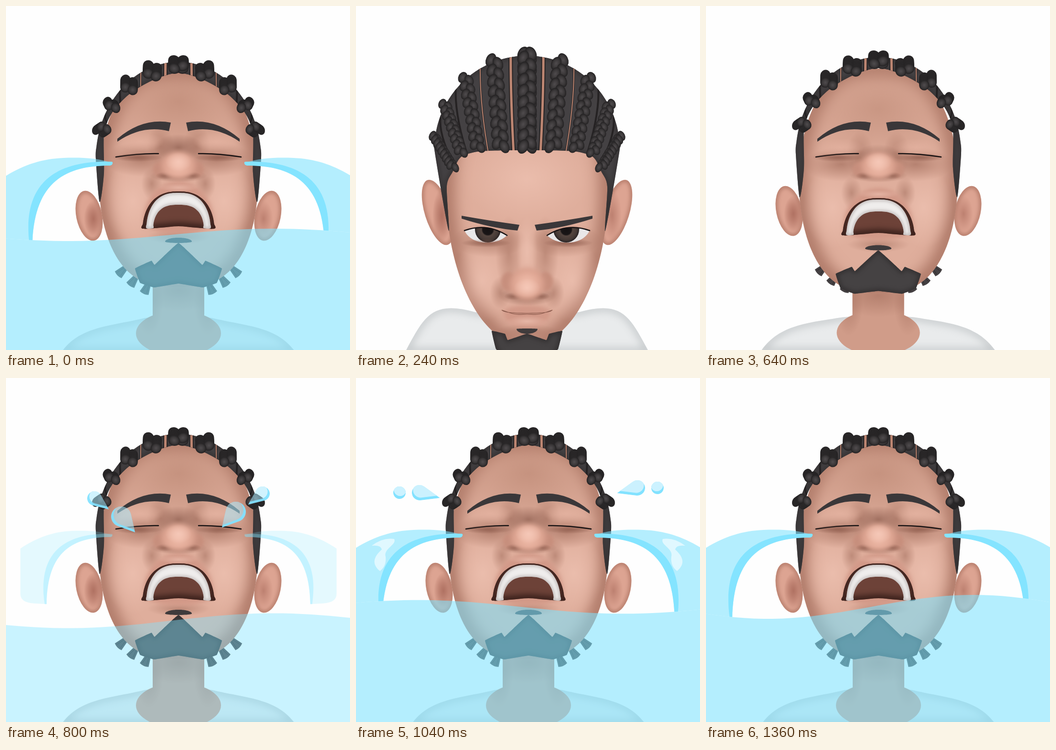
An HTML page with a canvas that plays this animation: 720x720 px, repeating every 1.44 s.

```html
<!DOCTYPE html>
<html>
<head>
<meta charset="utf-8">
<style>
  html, body { margin: 0; overflow: hidden; background: #fefefe; }
  canvas { display: block; }
</style>
</head>
<body>
<canvas id="stage" width="720" height="720"></canvas>
<script>
const ctx = document.getElementById('stage').getContext('2d');
const LOOP = 1440, STEP = 80, { PI, sin, cos } = Math;
const DARK = '#9a6554', LIGHT = '#efc3b3';

// Streams and glints, relative to the outer corner of the eye.
const STREAM = new Path2D('M0 0C-30-12-70-12-102-11C-150-9-190 5-234 34V150Q-234 172-200 174L-167 176C-165 40-100 5 0 4Z');
const BAND = new Path2D('M0-3C-90-6-195 20-172 176H-167C-165 40-100 5-4 5Q4 1 0-3Z');
const GLINT = new Path2D('M-189 22Q-165 4-142 8C-136 20-165 28-160 45Q-158 65-172 75C-190 60-185 45-168 30Q-170 20-189 22Z');

// Head pitch: 0 bowed, 1 level, 2 thrown back. Drawing is centred on the face axis.
let pitch = 0;
const at = (bowed, level, back) => pitch < 1 ? bowed + (level - bowed) * pitch : level + (back - level) * (pitch - 1);
const browY = () => at(457, 370, 250);
const eyeY = () => at(478, 410, 311);
const noseY = () => at(582, 496, 334);
const mouthY = () => at(643, 567, 425);

function track(t, ...keys) {
  for (let i = 0; i < keys.length - 2; i += 2) {
    const [t0, v0, t1, v1] = keys.slice(i, i + 4);
    if (t <= t0) return v0;
    if (t < t1) return v0 + (v1 - v0) * (t - t0) / (t1 - t0);
  }
  return keys[keys.length - 1];
}

function scoped(fn) { ctx.save(); fn(); ctx.restore(); }
function both(fn) { fn(); scoped(() => { ctx.scale(-1, 1); fn(); }); }

// Left half of an egg; a power below 1 makes it squarer. Ends at its widest if there is no bottom.
function egg(width, top, mid, power = 1, bottom) {
  const half = [], n = bottom ? 24 : 12;
  for (let i = 0; i <= n; i++) {
    const a = i * PI / 24, c = cos(a);
    half.push([-width * Math.max(0, sin(a)) ** power, mid - c * (c > 0 ? mid - top : bottom - mid)]);
  }
  half[0][0] = 0;
  if (bottom) half[n][0] = 0;
  return half;
}

// Smooth closed outline through a left half, from top centre to bottom centre, and its mirror image.
function symmetric(half, bend = 1 / 6) {
  const p = half.concat(half.slice(1, -1).reverse().map(([x, y]) => [-x, y]));
  const path = new Path2D(), n = p.length;
  path.moveTo(...p[0]);
  for (let i = 0; i < n; i++) {
    const [a, b, c, d] = [n - 1, 0, 1, 2].map(k => p[(i + k) % n]);
    path.bezierCurveTo(b[0] + (c[0] - a[0]) * bend, b[1] + (c[1] - a[1]) * bend,
      c[0] - (d[0] - b[0]) * bend, c[1] - (d[1] - b[1]) * bend, ...c);
  }
  return path;
}

function oval(x, y, rx, ry, turn = 0) {
  const path = new Path2D();
  path.ellipse(x, y, rx, ry, turn, 0, 2 * PI);
  return path;
}

function fill(path, color, blur = 0) {
  scoped(() => {
    if (blur) ctx.filter = `blur(${blur}px)`;
    ctx.fillStyle = color;
    ctx.fill(path);
  });
}

function line(path, color, width, blur = 0) {
  scoped(() => {
    if (blur) ctx.filter = `blur(${blur}px)`;
    ctx.strokeStyle = color;
    ctx.lineWidth = width;
    ctx.lineCap = 'round';
    ctx.stroke(path);
  });
}

// Fill with a soft dark rim inside.
function solid(path, color, rim, width, blur) {
  fill(path, color);
  scoped(() => { ctx.clip(path); line(path, rim, width, blur); });
}

function radial(stops, x = 0, y = 0, r = 1) {
  const g = ctx.createRadialGradient(x, y, 0, x, y, r);
  stops.forEach(s => g.addColorStop(...s));
  return g;
}

// Soft ellipse, mirrored when off the axis.
function glow(color, alpha, x, y, rx, ry) {
  const one = () => scoped(() => {
    ctx.translate(x, y);
    ctx.scale(rx, ry);
    ctx.globalAlpha *= alpha;
    fill(oval(0, 0, 1, 1), radial([[0, color], [1, color + '00']]));
  });
  if (x) both(one); else one();
}

function drawBody() {
  const x = at(-108, -108, -70), edge = at(-254, -262, -243);
  const half = `C${at(-200, -210, -140)} ${at(615, 618, 670)} ${at(-215, -225, -205)} ${at(650, 650, 670)} ${edge} 722`;
  const shirt = new Path2D(`M0 722V645L${x} ${at(641, 641, 653)}${half}Z`);
  both(() => solid(shirt, '#e9ebec', '#c3c7c9', 12, 8));
  const neck = oval(0, at(705, 676, 685), at(60, 74, 89), 47);
  neck.rect(-54, 560, 108, 110);
  fill(neck, '#d09c89');
  scoped(() => {
    ctx.clip(neck);
    glow(DARK, .5, -62, 620, 30, 70);
    glow(DARK, .5, 0, at(700, 680, 595), 90, 45);
  });
}

function drawTassels() {
  both(() => {
    for (let i = 0; i < 3; i++) scoped(() => {
      ctx.translate(0, 440);
      ctx.rotate(.42 + i * .19);
      ctx.translate(0, 165);
      fill(new Path2D('M-5-14H5L10 11Q0 15-10 11Z'), '#444042');
      line(new Path2D('M-2-8L-5 9M2-8L5 9'), '#2b2829', 1);
    });
  });
}

function drawEars() {
  both(() => {
    const y = at(432, 415, 439), turn = at(-.3, -.26, -.2);
    solid(oval(-187, y, 27, at(71, 70, 53), turn), '#dda492', '#a56c5b', 6, 4);
    glow('#a8695a', .6, -178, y + 6, 20, at(55, 52, 38));
  });
}

function drawFace() {
  const brow = browY(), eye = eyeY(), nose = noseY(), mouth = mouthY(), back = Math.max(0, pitch - 1);
  const face = symmetric(egg(at(170, 168, 166), at(130, 105, 135), at(380, 340, 370), at(1, .9, .7), at(712, 690, 588)));
  solid(face, '#dfae9c', '#a36d5c', 32, 16);
  scoped(() => {
    ctx.clip(face);
    glow(LIGHT, .7 * (1 - back), 0, brow - 95, 130, 95);
    glow('#bb8773', .7 * back, 0, brow - 50, 190, 130);
    glow(LIGHT, .7, -95, eye + 98, 62, 85);
    glow(DARK, .6, -78, eye + at(12, -10, 10), 78, 36);
    glow(DARK, .45, -38, (brow + nose) / 2, 28, at(80, 75, 45));
    glow('#7d4d3f', .6 * back, 0, nose - 38, 52, 28);
    glow(LIGHT, .7 * (1 - back), 0, (eye + nose) / 2 - 15, 22, 75);
    glow('#e3b19f', .9 * back, -80, eye - 27, 50, 20);
    glow(DARK, .5, -56, nose + at(18, 22, 38), 22, 34);
    glow(DARK, .5, 0, mouth + at(38, 44, 58), 65, 16);
  });
}

function drawNose() {
  const y = noseY(), tall = at(34, 36, 28), drop = at(-5, -4, 8);
  glow('#7d4d3f', .75, 0, y + tall * .75, 60, at(20, 18, 14));
  both(() => fill(oval(-39, y + drop, 15, tall * .6), '#c78f7d', 3));
  glow('#7d4d3f', .7, -28, y + tall * .75, 20, 8);
  fill(oval(0, y, 38, tall), radial([[0, '#f3c1af'], [.55, '#e3ab98'], [1, '#cb9280']], 0, y, 42), 5);
  glow('#f7cbbb', .8, 0, y + at(8, 12, -8), 28, 20);
}

function drawMouth() {
  const y = mouthY(), back = Math.max(0, pitch - 1), w = at(51, 58, 75);
  fill(symmetric(egg(w - 2, at(626, 545, 367), at(642, 567, 450), 1, at(674, 603, 476))), '#d29988', 4);
  glow(LIGHT, .7 * (1 - back), 0, y + 17, 44, 12);
  glow(LIGHT, .6 * back, 0, y - 45, 42, 9);
  const bottom = at(645, 568, 461), hole = egg(w, at(643, 566, 388), at(637, 567, 466), .8);
  const mouth = symmetric([...hole, [-w / 2, bottom + 3 * back], [0, bottom]]);
  if (!back) return line(mouth, '#8b5a4c', 1.2);
  solid(mouth, '#6d4238', '#3b211c', 1 + 15 * back, 6);
  scoped(() => {
    ctx.clip(mouth);
    ctx.translate(0, y - 425);
    const teeth = symmetric([...egg(67, 391, 465, .75), ...egg(53, 416, 465, .7).reverse()]);
    solid(teeth, '#efedec', '#aaa2a1', 4, 3);
  });
}

function drawGoatee() {
  const top = at(686, 615, 496), wide = at(.96, 1, 1.18), droop = at(-.35, 0, .42);
  const shape = [[0, 0], [-42, 28], [-48, 17], [-77, 21], [-68, 55], [-43, 75], [0, 85]];
  solid(symmetric(shape.map(([x, y]) => [x * wide, top + y - x * droop]), .03), '#454243', '#302d2e', 8, 5);
  fill(symmetric(egg(at(22, 24, 28), top - 11, top - at(10, 9, 3), 1, top)), '#403b3c');
}

function drawEyes() {
  both(() => {
    const y = eyeY(), left = at(470, 407, 316), right = at(480, 409, 309);
    const upper = `M-131 ${left}Q${at(-85, -85, -80)} ${at(453, 404, 308)}-42 ${right}`;
    const eye = new Path2D(`${upper}C-60 ${at(500, 420, 311)}-115 ${at(504, 421, 313)}-131 ${left}Z`);
    glow('#8d5b4c', .5, -86, y + at(18, 10, 6), 52, 9);
    if (pitch < 1.7) {
      fill(eye, '#e9e7e8');
      scoped(() => {
        ctx.clip(eye);
        const iy = at(468, 394, 285);
        fill(oval(-82, iy, 27, 27), radial([[0, '#151213'], [.4, '#191516'], [.5, '#54453f'], [.8, '#463a36'], [1, '#282223']], -82, iy, 27));
      });
    }
    line(new Path2D(upper), '#171213', 2.5);

    const b = browY(), bend = at(455, 354, 238), outer = at(442, 364, 281);
    const brow = `M-16 ${b + at(1, 2, -6)}Q-75 ${bend - 5}${at(-137, -137, -128)} ${outer - 3}v6Q-75 ${bend + 10}-20 ${b + at(13, 17, 12)}Z`;
    fill(new Path2D(brow), '#3a3739');
  });
}

function drawBraid({ front, back, r }) {
  const rows = 8, [fx, fy] = front, [bx, by] = back;
  const ry = Math.max(11, Math.hypot(fx - bx, fy - by) / rows * .68);
  for (let i = 0; i <= rows; i++) both2(side => {
    ctx.translate(bx + (fx - bx) * i / rows + side * r * .48, by + (fy - by) * i / rows + side * ry * .25);
    ctx.rotate(side * -.45);
    ctx.scale(r * .66, ry);
    fill(oval(0, 0, 1, 1), radial([[0, '#504c4e'], [.6, '#3b3839'], [1, '#232122']]));
  });
}
function both2(fn) { [-1, 1].forEach(side => scoped(() => fn(side))); }

function drawHair() {
  const width = at(194, 190, 173), top = at(104, 80, 117), mid = at(300, 270, 320);
  const braids = [0, 1, 2, 3, 4].map(i => {
    const a = i * at(.36, .36, .32);
    return {
      back: [-width * sin(a), mid - (mid - top) * cos(a)],
      front: [-157 * sin(i * .36), at(290, 195, 128) + at(45, 77, 127) * (i / 4) ** at(4, 2.5, 1.5)],
      r: at(17, 17, 19) - i * 1.5
    };
  });
  const hairline = braids.map(({ front: [x, y] }) => [x, y + 12]).reverse();
  const sideburn = [[at(-164, -168, -165), at(470, 437, 410)], [at(-168, -164, -156), at(378, 345, 350)]];
  const hair = symmetric([...egg(width, top, mid), ...sideburn, ...hairline], .14);
  solid(hair, '#444143', '#333031', 8, 5);
  scoped(() => {
    ctx.clip(hair);
    both(() => braids.slice(1).forEach((b, i) => {
      const [fx, fy, bx, by] = [...b.front, ...b.back].map((v, k) => (v + [...braids[i].front, ...braids[i].back][k]) / 2);
      const gap = new Path2D(`M${bx} ${by - 20}L${bx} ${by}Q${bx} ${(fy + by) / 2} ${fx} ${fy + 25}`);
      line(gap, '#252223', i ? 4 : 9);
      if (i < 2) line(gap, '#bd8672', 5 - i * 3);
    }));
  });
  both(() => braids.slice().reverse().forEach(drawBraid));
}

// Two drops fly outward from each eye, u = 0 near the face and 1 far out.
function drawDrops(u) {
  both2(side => {
    ctx.translate(361, side > 0 ? 0 : -10);
    ctx.scale(side, 1);
    for (let i = 0; i < 2; i++) {
      const r = 21 - 6 * i - (5 - 3 * i) * u, tail = i ? 38 * (1 - u) : 44, turn = .85 - .2 * i - .6 * u;
      const spread = tail > r ? Math.acos(r / tail) : 0;
      const drop = new Path2D();
      drop.arc(0, 0, r, spread, 2 * PI - spread);
      if (spread) drop.lineTo(tail, 0);
      drop.closePath();
      const edge = new Path2D(drop);
      edge.addPath(drop, new DOMMatrix([1, 0, 0, 1, 1, -6]));
      scoped(() => {
        ctx.translate(-120 - 56 * i - (108 - 14 * i) * u, 290 - 38 * i - (50 - 38 * i) * u);
        ctx.rotate(turn);
        fill(drop, 'rgba(170,234,255,.6)');
        ctx.clip(drop);
        ctx.fillStyle = '#82e2ff';
        ctx.fill(edge, 'evenodd');
      });
    }
  });
}

function drawWater(t) {
  const level = track(t, 640, 620, 720, 550, 800, 508, 880, 488, 960, 479);
  const swing = 25 * cos((t - 1360) / 490 * 2 * PI);
  const surface = end => {
    const path = new Path2D(`M-20 ${end}`);
    for (let x = -20; x <= 740; x += 20) path.lineTo(x, level + swing * cos((x - 130) / 860 * 2 * PI));
    path.lineTo(740, end);
    return path;
  };
  fill(surface(740), `rgba(126,227,255,${track(t, 640, 0, 720, .2, 800, .42, 880, .51, 960, .57)})`);

  const size = track(t, 720, .6, 800, .82, 880, .95, 960, 1);
  scoped(() => {
    ctx.clip(surface(-20));
    ctx.translate(361, 0);
    both(() => scoped(() => {
      ctx.translate(-139, 329);
      ctx.scale(size, size);
      ctx.globalAlpha = track(t, 720, 0, 800, .35, 880, .8, 960, 1);
      fill(STREAM, 'rgba(126,227,255,.57)');
      fill(BAND, '#84e4ff');
      ctx.globalAlpha = track(t, 880, 0, 1040, 1, 1200, 0);
      ctx.translate(-60, 150);
      ctx.rotate((1040 - t) / 500);
      ctx.translate(60, -150);
      fill(GLINT, '#e0f8ff');
    }));
  });
  ctx.globalAlpha = track(t, 640, 0, 720, .6, 800, .9, 1040, 1, 1200, 0);
  if (t < 1200) drawDrops((t - 800) / 240);
  ctx.globalAlpha = 1;
}

function draw(t) {
  const head = track(t, 80, .5, 160, .15, 240, 0, 320, .1, 480, 1, 560, 1.55, 640, 2);
  const settle = track(t, 560, 0, 640, 1, 720, .35, 800, 0);
  // The chin and shoulders lag behind the head while it settles.
  const part = (fn, dy = 0, lag = 0) => scoped(() => {
    pitch = head - settle * lag;
    ctx.translate(at(358, 358, 361), settle * dy);
    fn();
  });
  ctx.fillStyle = '#fefefe';
  ctx.fillRect(0, 0, 720, 720);
  part(drawBody, 0, .13);
  if (head > 1.7) part(drawTassels, -4);
  part(drawEars, -10);
  part(drawFace, 0, .13);
  part(drawMouth, 14);
  part(drawNose);
  part(drawEyes);
  part(drawGoatee, 0, .13);
  part(drawHair, -10);
  if (t > 640) drawWater(t);
}

let last = -1;
function tick() {
  // The loop opens on the final moment of the crying, then cuts to the bowed head.
  const t = Math.floor(performance.now() % LOOP / STEP) * STEP || LOOP;
  if (t !== last) draw(last = t);
  requestAnimationFrame(tick);
}
tick();
</script>
</body>
</html>
```
